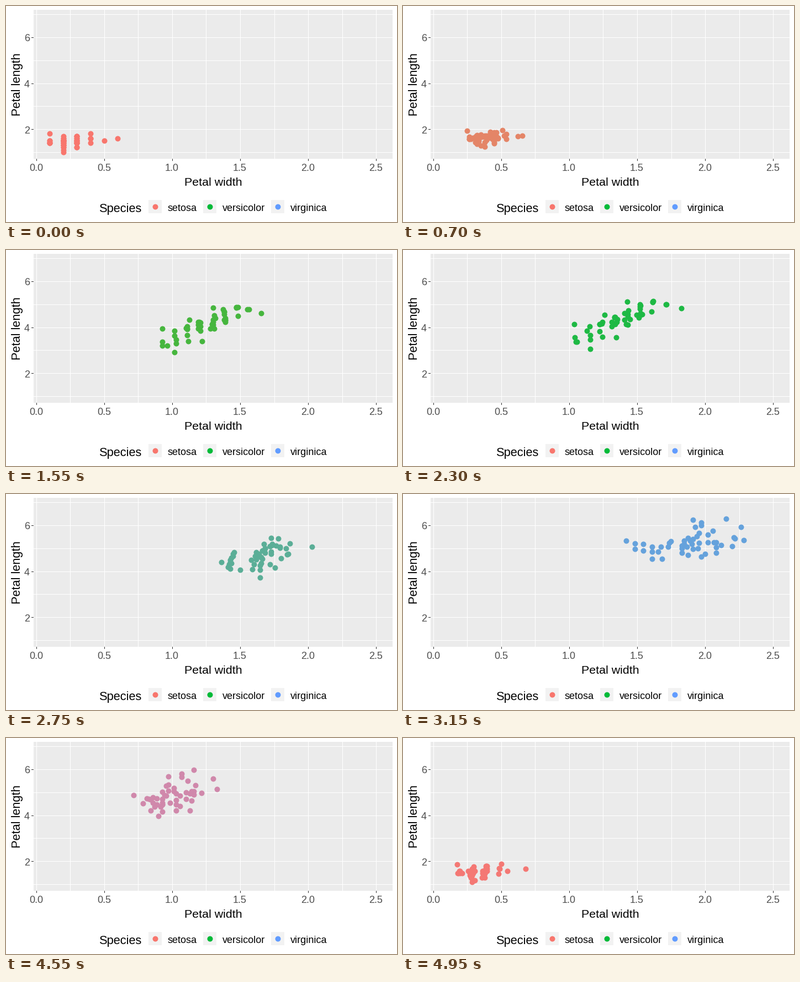
Write a matplotlib script that moves like this. It is 708 by 393 pixels and loops after 5000 ms.

```python
import numpy as np
import matplotlib.pyplot as plt
from matplotlib.animation import FuncAnimation
from matplotlib.patches import Rectangle

W, H, DPI = 708, 393, 96
FRAMES, INTERVAL = 100, 50
POINT = 10  # diameter in pixels
COUNT = 50  # flowers per species

COLORS = ["#F8766D", "#00BA38", "#619CFF"]
MOVES = [(11, 22), (45, 22), (79, 21)]  # last resting frame, frames to travel

# Per species: mean (width, length), spread, correlation, lower and upper bound
CLOUDS = [((0.24, 1.46), (0.09, 0.15), 0.30, (0.1, 1.1), (0.5, 1.9)),
          ((1.33, 4.30), (0.19, 0.42), 0.79, (1.0, 3.3), (1.7, 5.1)),
          ((2.00, 5.50), (0.25, 0.48), 0.30, (1.5, 4.8), (2.5, 6.7))]

# Outlying flowers: (width, length) for each species in turn
OUTLIERS = np.array([
    [(0.2, 1.7), (1.8, 4.8), (2.3, 5.7)],
    [(0.2, 1.5), (1.5, 4.5), (1.4, 5.6)],
    [(0.2, 1.5), (1.1, 3.0), (2.3, 5.4)],
    [(0.6, 1.6), (1.0, 3.3), (2.3, 5.9)],
    [(0.2, 1.0), (1.5, 4.9), (2.0, 6.7)],
    [(0.3, 1.7), (1.5, 4.5), (2.3, 6.9)],
    [(0.3, 1.4), (1.6, 4.7), (1.7, 4.5)],
])

rng = np.random.default_rng(4)


def bell(n):
    """Evenly spread quantiles of a bell curve in random order."""
    p = (np.arange(n) + 0.5) / n
    return rng.permutation(np.log(p / (1 - p)) / 1.7)


def cloud(mean, spread, corr, low, high):
    n = COUNT - len(OUTLIERS)
    u, v = bell(n), bell(n)
    z = np.column_stack([u, corr * u + np.sqrt(1 - corr ** 2) * v])
    return np.clip(np.round(mean + z * spread, 1), low, high)


FLOWERS = [np.vstack([cloud(*c), OUTLIERS[:, i]]) for i, c in enumerate(CLOUDS)]

RGB_TO_XYZ = np.array([[0.4124, 0.3576, 0.1805],
                       [0.2126, 0.7152, 0.0722],
                       [0.0193, 0.1192, 0.9505]])
WHITE = RGB_TO_XYZ.sum(axis=1)
XYZ_TO_LAB = np.array([[0, 116, 0], [500, -500, 0], [0, 200, -200]])


def to_lab(color):
    rgb = np.array([int(color[i:i + 2], 16) for i in (1, 3, 5)]) / 255
    lin = np.where(rgb > 0.04045, ((rgb + 0.055) / 1.055) ** 2.4, rgb / 12.92)
    t = RGB_TO_XYZ @ lin / WHITE
    f = np.where(t > 0.008856, np.cbrt(t), 7.787 * t + 16 / 116)
    return XYZ_TO_LAB @ f - [16, 0, 0]


def to_rgb(lab):
    fy = (lab[0] + 16) / 116
    f = np.array([fy + lab[1] / 500, fy, fy - lab[2] / 200])
    xyz = np.where(f > 0.2069, f ** 3, (f - 16 / 116) / 7.787) * WHITE
    lin = np.clip(np.linalg.solve(RGB_TO_XYZ, xyz), 0, 1)
    rgb = np.where(lin > 0.0031308, 1.055 * lin ** (1 / 2.4) - 0.055, 12.92 * lin)
    return np.clip(rgb, 0, 1)


LABS = [to_lab(c) for c in COLORS]


def bounce_out(t):
    if t < 4 / 11:
        return 121 * t * t / 16
    if t < 8 / 11:
        return 363 / 40 * t * t - 99 / 10 * t + 17 / 5
    if t < 9 / 10:
        return 4356 / 361 * t * t - 35442 / 1805 * t + 16061 / 1805
    return 54 / 5 * t * t - 513 / 25 * t + 268 / 25


def bounce_in(t):
    return 0 if t <= 0 else 1 - bounce_out(1 - t)


def px(v):
    return np.rint(54.6 + 246.3 * v)


def py(v):
    return np.rint(307.5 - 41.74 * v)


def mix(a, b, t):
    return a + (b - a) * t


fig = plt.figure(figsize=(W / DPI, H / DPI), dpi=DPI, facecolor="white")
ax = fig.add_axes([0, 0, 1, 1])
ax.set_xlim(0, W)
ax.set_ylim(H, 0)
ax.axis("off")


def box(x, y, w, h, color):
    ax.add_patch(Rectangle((x, y), w, h, fc=color, lw=0))


def label(x, y, text, size, color="black", ha="left", angle=0):
    ax.text(x, y, text, fontsize=size * 72 / DPI, family="Liberation Sans",
            color=color, ha=ha, va="baseline", rotation=angle,
            rotation_mode="anchor")


def dots(x, y, color):
    return ax.scatter(x, y, s=(POINT * 72 / DPI) ** 2, c=color, linewidths=0,
                      antialiased=False, zorder=3)


# Panel, grid, ticks
box(50, 7, 650, 271, "#EBEBEB")
for v in np.arange(0, 2.6, 0.25):
    box(px(v), 7, 1, 271, "white")
for v in range(1, 8):
    box(50, py(v), 650, 1, "white")
for v in np.arange(0, 2.6, 0.5):
    box(px(v), 278, 1, 4, "#333333")
    label(px(v) - 0.5, 300.5, f"{v:.1f}", 18, "#4D4D4D", "center")
for v in (2, 4, 6):
    box(46, py(v), 4, 1, "#333333")
    label(43, py(v) + 7.5, str(v), 18, "#4D4D4D", "right")
label(375, 327, "Petal width", 21.4, ha="center")
label(26, 143, "Petal length", 21.7, ha="center", angle=90)

# Legend
label(168.5, 375, "Species", 21.8)
for x, name, color in zip((258, 357, 480), ("setosa", "versicolor", "virginica"), COLORS):
    box(x, 353, 24, 24, "#F2F2F2")
    dots([x + 12], [365], color)
    label(x + 34.6, 373, name, 18)

points = dots(*FLOWERS[0].T, COLORS[0])


def update(frame):
    a = sum(frame > start + span for start, span in MOVES)
    start, span = MOVES[a]
    t = max(0, (frame - start) / span)
    b = (a + 1) % 3
    # Width glides evenly while length bounces into the move
    pos = mix(FLOWERS[a], FLOWERS[b], np.array([t, bounce_in(t)]))
    points.set_offsets(np.column_stack([px(pos[:, 0]), py(pos[:, 1])]))
    points.set_facecolor(to_rgb(mix(LABS[a], LABS[b], t)))
    return [points]


anim = FuncAnimation(fig, update, frames=FRAMES, interval=INTERVAL, repeat=True,
                     repeat_delay=0, blit=False)
plt.show()
```
